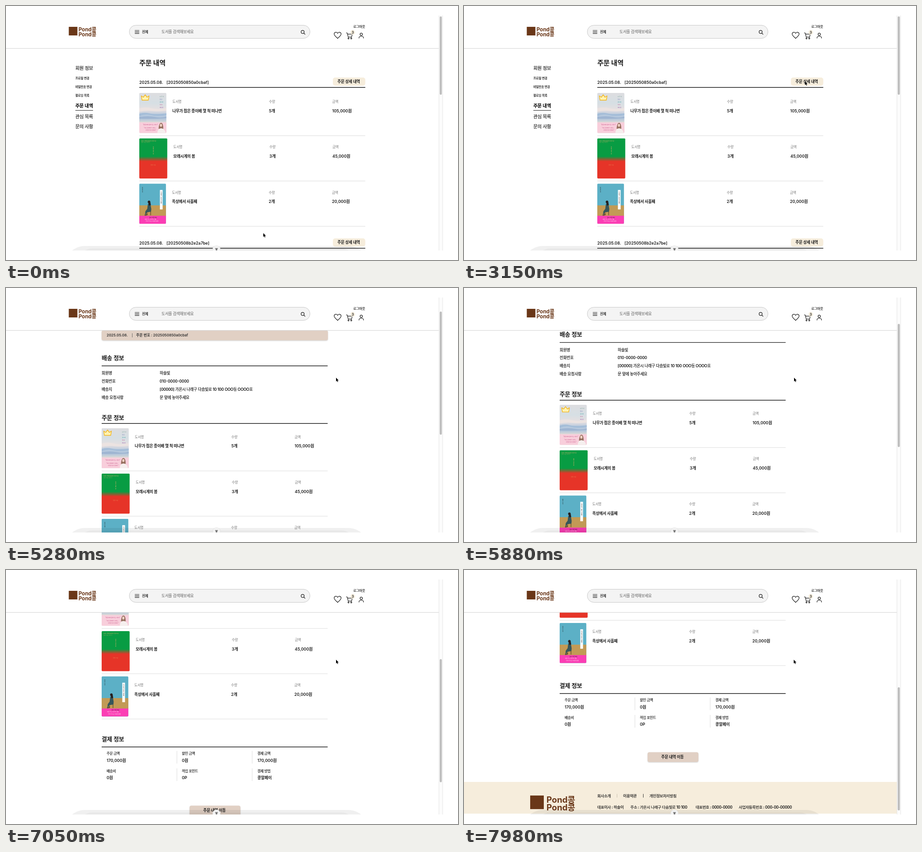
Write an HTML page that moves like this. It is 997 px wide and 561 px high and loops after 8000 ms.

```html
<!DOCTYPE html>
<html lang="ko">
<head>
<meta charset="utf-8">
<title>주문 내역</title>
<style>
@property --s { syntax: "<number>"; inherits: true; initial-value: 0; }
html, body { margin: 0; width: 100%; height: 100%; overflow: hidden; background: #fff; }
svg {
  display: block; width: 997px; height: 561px;
  font: 500 8.6px Inter, "Noto Sans CJK KR", "Noto Sans CJK", sans-serif;
  letter-spacing: -.03em; fill: #1c1c1c;
  animation: scroll 8s linear infinite;
}
.b { font-weight: 600; }
.n { letter-spacing: 0; }
.num { font-weight: 600; font-size: 8.9px; letter-spacing: 0; }
.lab { font-weight: 400; font-size: 7.5px; fill: #777; }
.small { font-size: 7.6px; }
.sub { font-size: 6.6px; }
.h1 { font-weight: 600; font-size: 15px; }
.h2 { font-weight: 600; font-size: 12.9px; }
.side { font-size: 10.2px; }
.side, .sub, .small, .info { stroke: #1c1c1c; stroke-width: .2px; }
.brand { font-weight: 700; fill: #6a3718; letter-spacing: 0; }
.tiny { font-size: 2.8px; letter-spacing: 0; }
.down { writing-mode: vertical-rl; }
.rule { stroke: #1c1c1c; stroke-width: 1.4; }
.hair { stroke: #dcdcdc; stroke-width: 1; }
.ico { fill: none; stroke: #1c1c1c; stroke-width: 1.2; stroke-linecap: round; stroke-linejoin: round; }
.tan { fill: #e1d0c4; filter: drop-shadow(.5px 1px 1px #0003); }

.list { animation: leave 8s step-end infinite; }
.detail { animation: enter 8s step-end infinite; }
.page { transform: translateY(calc(var(--s) * -1px)); }
.thumb { transform: translateY(calc(var(--s) * .527px)); }
.mouse { animation: mouse 8s infinite; }

@keyframes leave { 0% { opacity: 1; } 39.75%, 100% { opacity: 0; } }
@keyframes enter { 0% { opacity: 0; } 39.75%, 100% { opacity: 1; } }
@keyframes scroll {
  0% { --s: 0; }
  55.625% { --s: 0; animation-timing-function: cubic-bezier(.33, .25, .67, .65); }
  58.125% { --s: 13.5; animation-timing-function: cubic-bezier(.33, .31, .67, .515); }
  73.5% { --s: 106.5; animation-timing-function: cubic-bezier(.33, .2, .67, .654); }
  84.375% { --s: 265.5; animation-timing-function: cubic-bezier(.33, .32, .67, .8); }
  93.375% { --s: 407.5; animation-timing-function: cubic-bezier(.33, .51, .67, .79); }
  99.75%, 100% { --s: 447.9; }
}
@keyframes mouse {
  0%, 6% { transform: translate(567.5px, 501.5px); animation-timing-function: cubic-bezier(.4, 0, .55, .9); }
  19.875% { transform: translate(663.5px, 206px); animation-timing-function: cubic-bezier(.3, .3, .5, 1); }
  30%, 46.5% { transform: translate(752px, 166px); animation-timing-function: ease-in-out; }
  54%, 90% { transform: translate(728px, 198px); }
  93%, 100% { transform: translate(727.3px, 198px); }
}
</style>
</head>
<body>
<svg viewBox="0 0 997 561">
<defs>
  <clipPath id="screen"><rect y="21" width="964" height="519"/></clipPath>
  <clipPath id="round1"><rect width="59.700" height="88.600" rx="2"/></clipPath>
  <clipPath id="round2"><rect width="61.700" height="88.600" rx="2"/></clipPath>
  <clipPath id="round3"><rect width="58.800" height="88.600" rx="2"/></clipPath>
  <linearGradient id="sky" x2="0" y2="1">
    <stop offset="0" stop-color="#dddde0"/>
    <stop offset=".25" stop-color="#d6dfe4"/>
    <stop offset=".42" stop-color="#e6dfe0"/>
    <stop offset=".56" stop-color="#b4c8de"/>
    <stop offset=".66" stop-color="#b9c9da"/>
    <stop offset=".73" stop-color="#dcdad6"/>
  </linearGradient>
  <linearGradient id="forest" x2="0" y2="1">
    <stop offset=".45" stop-color="#089c43"/>
    <stop offset=".57" stop-color="#e63428"/>
  </linearGradient>

  <g id="cover1" clip-path="url(#round1)">
    <rect width="60" height="89" fill="url(#sky)"/>
    <path d="M0 34q14-4 28 0t32-1v6q-18 3-32 1t-28 2z" fill="#efe6e2" opacity=".7"/>
    <path d="M0 46q10-4 22-1t38 0v4q-20 3-34 0t-26 2z" fill="#9db8d6" opacity=".75"/>
    <path d="M0 53q20-3 34 0t26-1v4q-30 2-60 1z" fill="#8fa9cb" opacity=".6"/>
    <rect y="65" width="60" height="24" fill="#f8cedb"/>
    <path d="M42.500 79q1-13 5.500-13 5 0 5 13z" fill="#96705f"/>
    <ellipse cx="47.800" cy="71.500" rx="2.400" ry="3.300" fill="#f1d3c6"/>
    <path d="M40 89q0-10 8-11 9 1 10 11z" fill="#f5efee"/>
    <path d="M6 16 4.500 6.500l4.500 3 4-5.500 4 5.500 4.500-3L20 16z" fill="#fff3b0" stroke="#f2b51d" stroke-width="1.400" stroke-linejoin="round"/>
    <g class="tiny">
      <text x="45" y="9" fill="#4a8577">나 무 가</text>
      <text x="45" y="15" fill="#5b62a5">접 은</text>
      <text x="45" y="21" fill="#3a9aa0">종이배</text>
      <text x="45" y="27" fill="#c0457e">몇 척</text>
      <text x="45" y="33" fill="#8a45a2">떠나면</text>
      <g fill="#c0427c">
        <text x="8" y="71">“물결 따라 흘러가는 이야기”</text>
        <text x="10" y="78">“작은 종이배가 건네는</text>
        <text x="14" y="83">다정한 인사 한마디”</text>
      </g>
    </g>
  </g>

  <g id="cover2" clip-path="url(#round2)">
    <rect width="62" height="89" fill="url(#forest)"/>
    <g class="tiny" fill="#e7b06a">
      <text x="4" y="6.500">오래 기억될 봄날의 장편소설</text>
      <text x="4" y="10" opacity=".6">새로 엮은 이야기</text>
      <text class="down" x="31" y="17">모래시계의 봄</text>
      <text x="25" y="60" opacity=".7">장편 소설</text>
    </g>
  </g>

  <g id="cover3" clip-path="url(#round3)">
    <rect width="59" height="89" fill="#5cb0c6"/>
    <rect y="48" width="59" height="24" fill="#c29a55"/>
    <rect y="71" width="59" height="18" fill="#fb3eb4"/>
    <rect x="45.500" y="14" width="6" height="43" fill="#fff"/>
    <path d="M16 58h9M17 61l-1 9M25 60v10" stroke="#4a3420" fill="none"/>
    <path d="M19 45q4-1 6 2l1.500 9-.5 6-6 1-4 1-2 5h-1.500l1-8 4-5z" fill="#35565b"/>
    <path d="M18.500 41q0-3.500 3-3.500 3 0 3 4l1 6-4 1-1-4z" fill="#26201f"/>
    <path d="M13.500 68l-1.500 2h3l.5-2M18 66l-1 4" stroke="#26201f" stroke-width=".8" fill="none"/>
    <g class="tiny">
      <text class="down" x="48.500" y="17">옥상에서 보낸 사흘째</text>
      <text class="down" x="7" y="7">하늘 소설</text>
      <text x="22" y="75.500">높고 푸른 마음</text>
      <g fill="#fff"><text x="12" y="79.500">바람 부는 옥상의 사흘</text><text x="14" y="84">우리가 나눈 조용한 날들</text></g>
    </g>
  </g>

  <g id="books">
    <use href="#cover1"/>
    <use href="#cover2" y="100.300"/>
    <use href="#cover3" y="200.300"/>
    <g class="lab">
      <text x="73" y="22">도서명</text><text x="286" y="22">수량</text><text x="425.500" y="22">금액</text>
      <text x="75" y="122.300">도서명</text><text x="287" y="122.300">수량</text><text x="426" y="122.300">금액</text>
      <text x="72" y="222.500">도서명</text><text x="285.500" y="222.500">수량</text><text x="425" y="222.500">금액</text>
    </g>
    <g class="b">
      <text x="73" y="42.800">나무가 접은 종이배 몇 척 떠나면</text>
      <text x="75" y="143">모래시계의 봄</text>
      <text x="72" y="243.400">옥상에서 사흘째</text>
    </g>
    <g class="num">
      <text x="286" y="42.800">5개</text><text x="425.500" y="42.800">105,000원</text>
      <text x="287" y="143">3개</text><text x="426" y="143">45,000원</text>
      <text x="285.500" y="243.400">2개</text><text x="425" y="243.400">20,000원</text>
    </g>
    <path class="hair" d="M0 94.500h498.500M0 194.500h498.500M0 294.500h498.500"/>
  </g>

  <g id="more">
    <rect x="721" y="158" width="71.500" height="18" rx="5" fill="#f6eddc"/>
    <text class="b" x="731" y="170">주문 상세 내역</text>
    <path class="rule" d="M294 179.700h498.500"/>
    <text class="num" x="294" y="171.500">2025.05.08.</text>
  </g>
</defs>

<g clip-path="url(#screen)">
  <g class="list">
    <text class="h1" x="294" y="130.500">주문 내역</text>
    <g class="side">
      <text x="153" y="141.300">회원 정보</text>
      <text class="b" x="153" y="224">주문 내역</text>
      <text x="153" y="248">관심 목록</text>
      <text x="153" y="270.300">문의 사항</text>
    </g>
    <g class="sub">
      <text x="153" y="162">프로필 변경</text>
      <text x="153" y="181">비밀번호 변경</text>
      <text x="153" y="200.300">팔로잉 목록</text>
    </g>
    <path d="M153 230.500h39" stroke="#1c1c1c"/>
    <use href="#more"/>
    <text class="num" x="354" y="171.500">[2025050850a0cbaf]</text>
    <use href="#books" x="294" y="192"/>
    <use href="#more" y="355.300"/>
    <text class="num" x="354" y="526.800">[20250508b2e2a7be]</text>
  </g>

  <g class="detail"><g class="page">
    <text class="h1" x="211" y="130.500">주문 상세 내역</text>
    <rect class="tan" x="211" y="148.500" width="499" height="22" rx="4"/>
    <g class="b n" font-size="7.900" fill="#333">
      <text x="222" y="162.300">2025.05.08.</text>
      <text x="287" y="162.300">주문 번호 : 2025050850a0cbaf</text>
    </g>
    <path d="M278.500 155v9" stroke="#555" stroke-width=".8"/>

    <text class="h2" x="211" y="214">배송 정보</text>
    <path class="rule" d="M211 227h498.500"/>
    <g class="info">
      <text x="211" y="246.300">회원명</text><text x="339" y="246.300">하솔빛</text>
      <text x="211" y="264">전화번호</text><text class="n" x="339" y="264" font-size="8.300">010-0000-0000</text>
      <text x="211" y="281.800">배송지</text><text x="339" y="281.800">[00000] 가온시 나래구 다솜빛로 10 100 OOO동 OOOO호</text>
      <text x="211" y="299.500">배송 요청사항</text><text x="339" y="299.500">문 앞에 놓아주세요</text>
    </g>

    <text class="h2" x="211" y="345.500">주문 정보</text>
    <path class="rule" d="M211 354.300h498.500"/>
    <use href="#books" x="211" y="364.500"/>

    <text class="h2" x="211" y="707.500">결제 정보</text>
    <path class="rule" d="M211 720.600h498.500"/>
    <g class="small">
      <text x="222" y="738.300">주문 금액</text><text x="388" y="738.300">할인 금액</text><text x="554.500" y="738.300">결제 금액</text>
      <text x="222" y="776.500">배송비</text><text x="388" y="776.500">적립 포인트</text><text x="554.500" y="776.500">결제 방법</text>
    </g>
    <g class="num">
      <text x="222" y="753.700">170,000원</text><text x="388" y="753.700">0원</text><text x="554.500" y="753.700">170,000원</text>
      <text x="222" y="791.800">0원</text><text x="388" y="791.800">0P</text><text class="b" x="554.500" y="791.800" font-size="8.600">콩알페이</text>
    </g>
    <path class="hair" d="M377 729.500v28M543 729.500v28M377 768v28M543 768v28"/>
    <rect class="tan" x="405" y="850.500" width="112" height="21.500" rx="4"/>
    <text class="b" x="435" y="864.300">주문 내역 이동</text>

    <rect y="916" width="955" height="70" fill="#f6eddc"/>
    <rect x="146" y="946" width="30" height="30" fill="#6a3718"/>
    <g class="brand" font-size="18.500"><text x="182" y="961.500">Pond콩</text><text x="182" y="979">Pond콩</text></g>
    <g class="info" font-size="8.400">
      <text x="294" y="949.700">회사소개</text><text x="351" y="949.700">이용약관</text><text x="409" y="949.700">개인정보처리방침</text>
      <text x="294" y="974.700">대표이사 : 하솔이</text>
      <text x="367" y="974.700">주소 : 가온시 나래구 다솜빛로 10 100</text>
      <text x="511" y="974.700">대표번호 : 0000-0000</text>
      <text x="606" y="974.700">사업자등록번호 : 000-00-00000</text>
    </g>
    <path d="M337.500 942.500v8" stroke="#c9c0ae"/>
    <path d="M395.500 942.500v8" stroke="#333"/>
  </g></g>

  <!-- header -->
  <rect y="21" width="955" height="73" fill="#fff"/>
  <path d="M0 93.700h955" stroke="#d9d9d9" stroke-width="1.300"/>
  <rect x="138.500" y="46" width="19" height="19" fill="#6a3718"/>
  <g class="brand" font-size="11.500"><text x="160" y="56.300">Pond콩</text><text x="160" y="67">Pond콩</text></g>
  <rect x="272" y="42.500" width="398.500" height="29" rx="14.500" fill="#f4f4f4" stroke="#c8c8c8"/>
  <path class="ico" d="M284.500 54h9M284.500 57.300h9M284.500 60.600h9"/>
  <text class="small" x="300" y="60">전체</text>
  <text x="343" y="60.300" fill="#5c5c5c">도서를 검색해보세요</text>
  <g class="ico">
    <circle cx="654.300" cy="57.300" r="3.400"/><path d="m657 60 2.700 2.700"/>
    <path d="M731.500 71.500C727 67.500 723.800 65 723.800 61.800 723.800 57.500 729.300 56.500 731.500 60.500 733.700 56.500 739.200 57.500 739.200 61.800 739.200 65 736 67.500 731.500 71.500z"/>
    <path d="M750.500 59.500h2.200l2.200 9h7.300l1.600-6.300h-10.300"/>
    <circle cx="755.500" cy="71.500" r="1.300"/><circle cx="761.500" cy="71.500" r="1.300"/>
    <circle cx="783.600" cy="62.500" r="2.600"/><path d="M778.600 71q0-4 3.500-4h3q3.500 0 3.500 4"/>
  </g>
  <circle cx="764.800" cy="58.300" r="5" fill="#f6eddc"/>
  <text class="b" x="764.800" y="61" font-size="7.500" text-anchor="middle">3</text>
  <text class="info" x="766" y="48" font-size="7.400">로그아웃</text>

  <!-- scrollbar -->
  <rect x="955" y="21" width="8" height="519" fill="#fcfcfc"/>
  <path d="M955 21v519M963 21v519" stroke="#e4e4e4"/>
  <rect class="list" x="956.700" y="23" width="4.600" height="173" rx="2.300" fill="#bdbdbd"/>
  <g class="detail"><rect class="thumb" x="956.700" y="23" width="4.600" height="272" rx="2.300" fill="#bdbdbd"/></g>

  <!-- dock -->
  <rect x="129" y="530" width="671" height="90" rx="45" fill="#000" opacity=".06"/>
  <rect x="160" y="535.500" width="610" height="60" rx="30" fill="#000" opacity=".035"/>
  <circle cx="464.300" cy="538" r="8.800" fill="#f3f3f3" stroke="#0001"/>
  <path d="M460.800 534.800h7l-2.200 3h1.200l-2.500 3.200-2.500-3.200h1.200z" fill="#777"/>
</g>

<path class="mouse" d="M0 0v8.400l1.900-1.700 1.400 3 1.300-.6-1.400-2.900h2.600z" fill="#000" stroke="#fff" stroke-width=".7" paint-order="stroke"/>
</svg>
</body>
</html>
```
